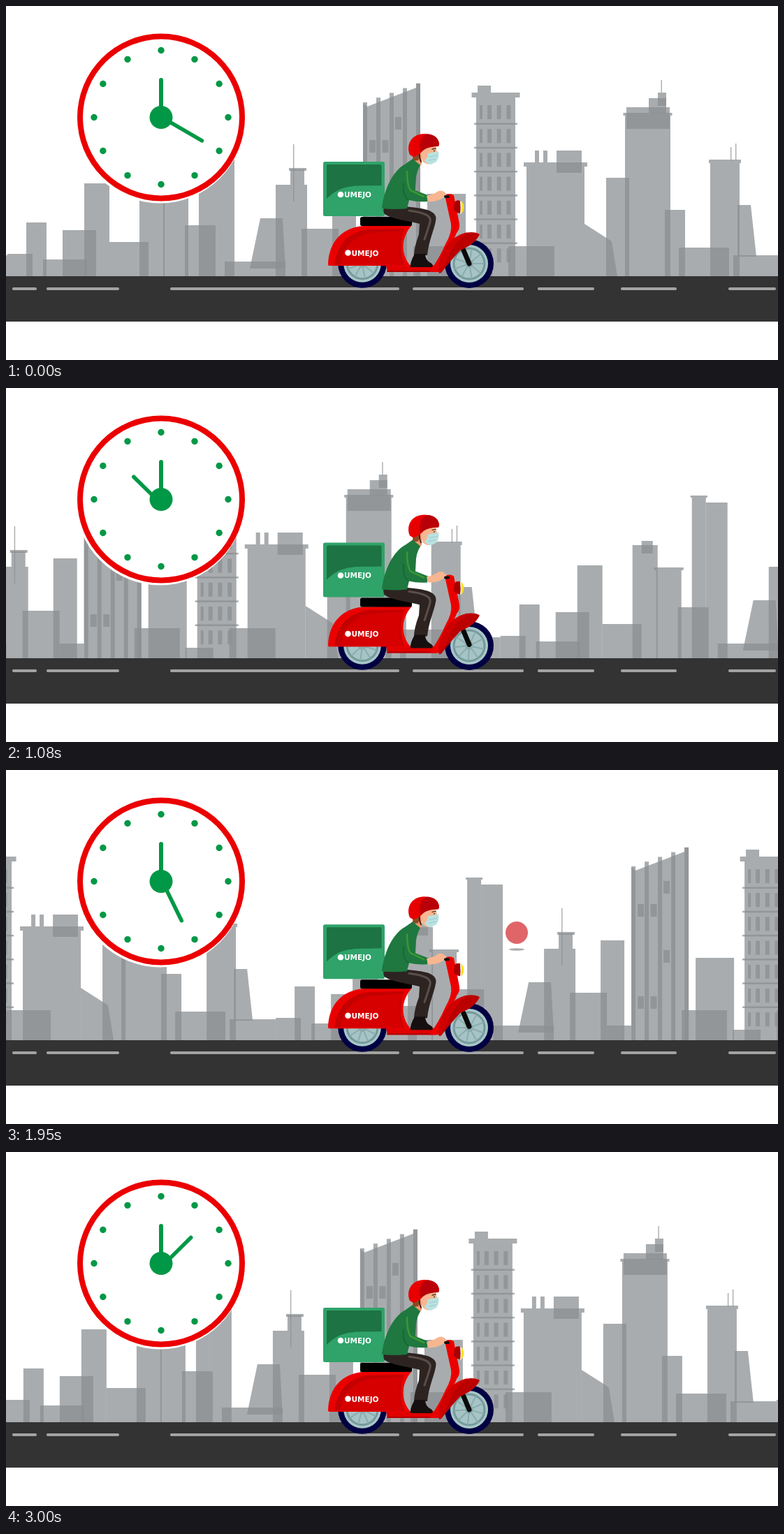
Recreate the animation shown at these times as an HTML page with a canvas. Size 1105 px wide and 507 px high, loop 3.03 s.

```html
<!DOCTYPE html>
<html lang="en">
<head>
<meta charset="utf-8">
<title>Delivery scooter</title>
<style>
html, body { margin: 0; width: 100%; height: 100%; overflow: hidden; background: #fff; }
canvas { display: block; width: 1105px; height: 507px; }
</style>
</head>
<body>
<canvas id="stage" width="1105" height="507"></canvas>
<script>
const ctx = document.getElementById('stage').getContext('2d');
const W = 1105, H = 507, GROUND = 387;
const LOOP = 3030, STEP = 30, TAU = Math.PI * 2;
const SPEED = 0.3697; // px per ms

// ---- helpers ----
function fill(d, color) {
  ctx.fillStyle = color;
  ctx.fill(new Path2D(d));
}
function line(d, color, width) {
  ctx.strokeStyle = color;
  ctx.lineWidth = width;
  ctx.lineCap = ctx.lineJoin = 'round';
  ctx.stroke(new Path2D(d));
}
function disc(x, y, r, color) {
  ctx.fillStyle = color;
  ctx.beginPath();
  ctx.arc(x, y, r, 0, TAU);
  ctx.fill();
}
function box(x, y, w, h, r, color) {
  ctx.fillStyle = color;
  ctx.beginPath();
  ctx.roundRect(x, y, w, h, r);
  ctx.fill();
}
const clamp01 = v => Math.max(0, Math.min(1, v));

// ---- skyline: translucent shapes that darken where they overlap ----
const CITY = 'rgba(140,143,146,.74)';
const block = (x, top, w, h = GROUND - top) => ctx.fillRect(x, top, w, h);
const mast = (x, top, h) => block(x, top, 1.4, h);
function slabBlock(x, top, w, over, slab = 5) {
  block(x, top, w);
  block(x - over, top - slab, w + 2 * over, slab);
}

function drawLeaningBlock(x) {
  fill(`M${x} 139L${x + 6} 144L${x + 76} 117V111H${x + 82}V${GROUND}H${x}Z`, CITY);
  for (let i = 0; i < 5; i++) block(x + i * 19, 138 - i * 6.8, 6);
  for (let i = 0; i < 6; i++) block(x + 9 + (i % 3) * 18.5, i % 3 < 2 ? 192 + (i > 2) * 132 : 159 + (i > 2) * 99, 9, 18);
}

function drawWindowTower(x) {
  slabBlock(x, 131, 56, 6.5, 7);
  block(x + 2, 114, 19, 10);
  for (let row = 0; row < 7; row++) {
    const y = 142 + row * 34.2;
    block(x + 5, y, 4, 20);
    for (let col = 0; col < 3; col++) block(x + 16 + col * 13.7, y, 6, 20);
    if (row < 6) block(x - 3, y + 25.5, 62, 2.5);
  }
}

function drawWestSide() {
  block(2, 355, 36);
  block(29, 310, 29);
  block(53, 363, 63);
  block(81, 321, 48);
  block(112, 254, 36);
  block(148, 338, 56);
  block(191, 225, 36);
  block(204, 219, 16, 18);
  slabBlock(225, 261, 36, 3, 4);
  block(256, 314, 44);
  slabBlock(276, 157, 20, 2, 3);
  block(296, 164, 31);
}

function drawCentre() {
  block(313, 366, 87);
  fill('M349 376L364 304H396L400 376Z', CITY);
  block(386, 256, 45);
  block(407, 234, 20, 22);
  block(405, 232, 25, 4);
  mast(411, 198, 82);
  block(423, 319, 53);
  block(467, 244, 34);
  block(476, 366, 35);
  drawLeaningBlock(511);
  block(583, 344, 65);
  block(603, 269, 55);
  block(656, 372, 40);
  drawWindowTower(673);
}

function drawEastSide() {
  block(719, 344, 66);
  slabBlock(745, 230, 83, 4, 6);
  for (const x of [757, 769]) block(x, 207, 6, 17);
  block(788, 207, 36, 32);
  fill('M828 312L867 337L875 387H828Z', CITY);
  block(859, 246, 33);
  slabBlock(886, 157, 65, 2.5, 4);
  block(888, 145, 62, 31);
  block(920, 132, 25, 22);
  block(933, 124, 12, 19);
  mast(937.5, 106, 18);
  block(943, 292, 29);
  block(963, 346, 72);
  slabBlock(1008, 225, 42, 2);
  mast(1037, 202, 20);
  mast(1044, 197, 24);
  fill('M1047 285H1066L1074 359H1047Z', CITY);
  block(1041, 357, 66);
}

function drawSkyline(t) {
  const shift = (t * SPEED) % W;
  for (let k = -1; k <= 1; k++) {
    ctx.save();
    ctx.translate(k * W - shift, 0);
    ctx.fillStyle = CITY;
    drawWestSide();
    drawCentre();
    drawEastSide();
    ctx.restore();
  }
}

// ---- place marker: pops up, then fades ----
function drawMarker(t) {
  const p = t % 1500;
  const grow = clamp01((p - 90) / 130);
  if (!grow || p > 495) return;
  ctx.save();
  ctx.globalAlpha = (0.25 + 0.45 * grow) * clamp01((495 - p) / 45);
  ctx.translate(731, 257);
  ctx.scale(grow, grow);
  ctx.fillStyle = '#8a8a8a';
  ctx.beginPath();
  ctx.ellipse(0, 0, 11, 1.8, 0, 0, TAU);
  ctx.fill();
  disc(0, -24, 16, '#d2232a');
  ctx.restore();
}

// ---- road ----
function drawRoad() {
  ctx.fillStyle = '#333';
  ctx.fillRect(0, GROUND, W, 65);
  line('M11 405H42M60 405H160M237 405H561M584 405H739M763 405H840M882 405H958M1036 405H1100', '#a3a3a3', 4.2);
}

// ---- clock ----
const CX = 222, CY = 159.5, GREEN = '#009846', TURN = 1680;

// the minute hand turns unevenly about a slightly swaying pivot
function drawMinuteHand(t) {
  const wave = (lag, n = 1) => Math.cos(n * TAU * (t - lag) / TURN);
  const deg = 94.5 + 360 * t / TURN - 34 * wave(720) + 7 * wave(525, 2);
  const len = 61 + 7 * wave(90);
  const y = 161 - 5 * wave(300);
  const a = deg * TAU / 360;
  line(`M${CX} ${y}L${CX + Math.sin(a) * len} ${y - Math.cos(a) * len}`, GREEN, 5.5);
}

function drawClock(t) {
  disc(CX - 1.5, CY + 2, 121, '#fff');
  disc(CX, CY, 120, '#eb0000');
  disc(CX, CY, 112, '#fff');
  for (let i = 0; i < 12; i++) {
    const a = i * TAU / 12;
    disc(CX + Math.sin(a) * 96, CY - Math.cos(a) * 96, 4.7, GREEN);
  }
  drawMinuteHand(t);
  line(`M${CX} ${CY}V106`, GREEN, 6);
  disc(CX, CY, 16.5, GREEN);
}

// ---- scooter ----
function drawWheel(x, y, r, t) {
  disc(x, y, r, '#000043');
  disc(x, y, r - 8, '#a8c7c8');
  disc(x, y, r - 11.5, '#76999b');
  disc(x, y, r - 14.5, '#a6c4c5');
  ctx.save();
  ctx.translate(x, y);
  ctx.rotate(t * SPEED / r);
  for (let i = 0; i < 9; i++) {
    ctx.rotate(TAU / 9);
    line(`M5 0H${r - 14}`, '#8aacae', 2);
  }
  ctx.restore();
  disc(x, y, 6, '#8aacae');
}

function drawBadge(x, y) {
  disc(x, y, 4.3, '#fff');
  ctx.fillStyle = '#fff';
  ctx.font = 'bold 10.5px "DejaVu Sans", sans-serif';
  ctx.textBaseline = 'alphabetic';
  ctx.fillText('UMEJO', x + 5, y + 4);
}

function drawBody() {
  // floor and leg shield
  fill('M544 371H612L616 381H546Z', '#e00000');
  line('M546 380H614', '#b40000', 2);
  fill('M628 271Q635 267 641 271L649 312Q650 319 645 325L621 381H606Q620 362 629 341Q639 324 637 312Z', '#eb0000');
  // rear cowl
  fill('M461 370C462 337 482 317 512 315L581 314C564 333 565 357 580 373L545 372H463Q461 372 461 370Z', '#eb0000');
  fill('M470 371C474 341 490 324 518 320L570 319C563 335 563 356 570 371Z', '#c40000');
  fill('M478 371C482 345 497 330 521 325L568 322C561 337 561 356 568 371Z', '#d60000');
  // seat
  box(507, 302, 74, 13, 2.5, '#000');
  drawBadge(489.5, 353.5);
}

function drawFront() {
  line('M655 350L663 369', '#0a0a0a', 7);
  fill('M620 383C617 361 633 326 665 324Q674 324 678 327C673 338 662 345 650 350Q637 364 623 382Z', '#bb0000');
  fill('M620 383C618 360 634 329 661 324Q640 340 634 358Q629 372 620 383Z', '#d00000');
  fill('M642 281Q645 277 650 279L651 297Q645 297 641 292Z', '#a80000');
  fill('M650 279Q655 280 655.5 288Q655 296 650 298Q652 288 650 279Z', '#f3e32c');
  line('M650.5 280Q652.5 288 650.5 297', '#eef3f3', 1.2);
}

function drawBox() {
  box(454, 223, 88, 78, 2.5, '#2fa36a');
  fill('M460 227H536Q537.5 227 537.5 229V257C518 258 500 256 486 260C471 264 466 270 459 276V229Q459 227 460 227Z', '#1d7343');
  drawBadge(479, 270);
}

function drawRider() {
  // legs and shoe
  fill('M540 291C551 286 580 286 603 292Q618 297 615 308C613 320 605 337 603 357H584Q584 346 591 327L592 312C574 307 550 305 541 297Z', '#2d2422');
  line('M577 293C601 296 609 301 607 309Q604 320 599 334', '#5b4e4a', 3);
  fill('M585 355H600Q600 364 608 368Q612 370 610 374H579Q578 367 585 355Z', '#15100f');
  // neck
  fill('M583 213L595 210V226L591 232L581 222Z', '#e89a72');
  fill('M583 211L593 213L590 221L582 222Z', '#8a4a25');
  // jacket
  fill('M582 219L593 228Q588 237 587 246L586 264L604 271L603 280Q588 281 577 278L574 290Q556 292 538 290C540 269 551 237 572 226Z', '#1f783f');
  line('M574 237Q574 257 579 264Q590 269 598 273', '#3b9634', 2.6);
  line('M576 278Q567 271 569 254', '#17632f', 1.3);
  // hand and grip
  fill('M602 272Q612 270 619 265Q626 263 630 269Q632 274 625 275Q617 281 604 280Z', '#f8b690');
  line('M629 273H633', '#111', 4);
  // head
  fill('M592 204L615 200L617 209L611 225Q602 229 596 222Z', '#f8b690');
  line('M610 205L615 204', '#5c2d16', 1.3);
  disc(613, 207.5, 0.9, '#2d2422');
  fill('M604 211Q612 210 619 208Q621 216 616 223L608 227Q601 225 599 221Q604 217 604 211Z', '#b9e2e0');
  line('M606 216Q612 215 617 214M605 221Q611 220 615 219', '#93c5c5', 0.8);
  line('M592 208Q591 217 594 223', '#4d1512', 1.8);
  fill('M578 213C572 198 581 183 599 183Q619 184 620 198L619 201Q605 201 598 206Q591 214 583 216Z', '#e80000');
  fill('M593 209C591 195 594 187 603 183.3Q619 185 620 198L619 201Q605 201 598 206Z', '#b90008');
}

function drawScooter(t) {
  drawWheel(510, 369, 34.8, t);
  drawWheel(663, 369, 35, t);
  ctx.save();
  ctx.translate(0, 0.85 * (Math.cos(t / 300 * TAU) - 1));
  drawBody();
  drawFront();
  drawBox();
  drawRider();
  ctx.restore();
}

function draw() {
  const t = Math.floor((performance.now() % LOOP) / STEP) * STEP;
  ctx.fillStyle = '#fff';
  ctx.fillRect(0, 0, W, H);
  drawSkyline(t);
  drawMarker(t);
  drawRoad();
  drawClock(t);
  drawScooter(t);
  requestAnimationFrame(draw);
}
draw();
</script>
</body>
</html>
```
